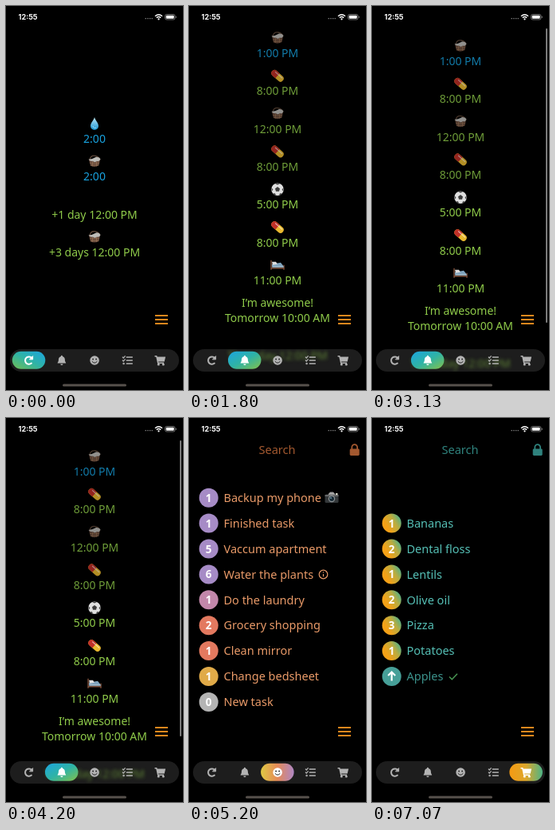
Animation of 222x480 px, one loop 7540 ms. Source, as an HTML page:

```html
<!DOCTYPE html>
<html lang="en">
<head>
<meta charset="utf-8">
<title>Reminders and lists</title>
<style>
  html, body { margin: 0; width: 100%; height: 100%; overflow: hidden; background: #000; }
  svg { display: block; width: 100%; height: 100%; }
  text { font-family: "Noto Sans", "Open Sans", sans-serif; }
  .time { font-size: 14px; text-anchor: middle; }
  .item { font-size: 14.5px; }
  .search { font-size: 14.6px; text-anchor: middle; }
  .count { font-size: 13.5px; font-weight: 700; fill: #fff; text-anchor: middle; }
  .clock { font: 700 9.1px Inter, sans-serif; fill: #fff; }
  .line { fill: none; stroke: currentColor; stroke-linecap: round; stroke-linejoin: round; }
</style>
</head>
<body>
<svg id="stage" viewBox="0 0 222 480">
  <defs>
    <linearGradient id="pill0" x1="0" y1="1" x2="1" y2="0"><stop stop-color="#72bf52"/><stop offset=".5" stop-color="#2fb3a5"/><stop offset="1" stop-color="#1ca5e0"/></linearGradient>
    <linearGradient id="pill1" x1="0" y1="0" x2="1" y2="1"><stop stop-color="#1ca5e0"/><stop offset=".5" stop-color="#2fb3a5"/><stop offset="1" stop-color="#84c24a"/></linearGradient>
    <linearGradient id="pill3"><stop stop-color="#dfc943"/><stop offset=".5" stop-color="#e58a58"/><stop offset="1" stop-color="#ae86c4"/></linearGradient>
    <linearGradient id="pill4"><stop stop-color="#f59a12"/><stop offset=".5" stop-color="#dda72c"/><stop offset="1" stop-color="#4db486"/></linearGradient>
    <linearGradient id="fruit" x1="0" y1=".8" x2="1" y2=".2"><stop offset=".25" stop-color="#f4a117"/><stop offset=".65" stop-color="#b9ac40"/><stop offset="1" stop-color="#45b08f"/></linearGradient>
    <linearGradient id="water" x1="0" y1="0" x2="0" y2="1"><stop stop-color="#bfe9fa"/><stop offset="1" stop-color="#1690d0"/></linearGradient>
    <clipPath id="navClip"><rect x="5" y="429" width="212" height="28" rx="14"/></clipPath>
    <filter id="blur" x="-10%" y="-60%" width="120%" height="220%"><feGaussianBlur stdDeviation="2"/></filter>

    <g id="drop">
      <path d="M0-8C1-4 5-1 5 3A5 5 0 0 1-5 3C-5-1-1-4 0-8Z" fill="url(#water)"/>
      <path d="M-2 3a2.5 2.5 0 0 0 4 2" fill="none" stroke="#9fe0f8"/>
    </g>
    <g id="basket">
      <path d="M-6-2Q-5-8 1-7Q6-6 7-2" fill="none" stroke="#5a4436" stroke-width="1.3"/>
      <path d="M-7-2H7L5.5 5Q0 8-5 5.5Z" fill="#65483a"/>
      <path d="M-6 2H6M-5 4.6H5M-2.5 0V6M2.5 0V6" stroke="#9a7557" stroke-width=".7"/>
      <path d="M-7.5-2.5Q-2-3 2-5.5Q6-6 7.5-3Q6 1 3-.5Q0 2-2-.5Q-5 .5-7.5-2.5Z" fill="#bdbcb8"/>
    </g>
    <g id="capsule" transform="rotate(42)">
      <rect x="-9" y="-4" width="18" height="8" rx="4" fill="#e9b92f"/>
      <path d="M0-4H-5A4 4 0 0 0-5 4H0Z" fill="#c03028"/>
      <path d="M-5-1.8H6" stroke="#fff" stroke-opacity=".6" stroke-width="1.2" stroke-linecap="round"/>
    </g>
    <g id="ball">
      <circle r="7.8" fill="#dedede"/>
      <path d="M0-3.2L3-1L2 2.6H-2L-3-1ZM-3-7.2H3L0-5.6ZM7.6-2L7.2 2.8L5.6 0ZM-7.6-2L-7.2 2.8L-5.6 0ZM3 5L6 5Q4 7.2 2 7.5ZM-3 5L-6 5Q-4 7.2-2 7.5Z" fill="#3c3c3c"/>
    </g>
    <g id="bed">
      <path d="M-8-6V6M8 0V6M-8 4H8" stroke="#80503a" stroke-width="1.4"/>
      <path d="M-7-1L4-3L8 2V3H-7Z" fill="#7fa3bd"/>
      <path d="M-7-4H-2L0-1L-6 0Z" fill="#dedede"/>
      <path d="M-6 2H7" stroke="#b9ccd8"/>
    </g>
    <g id="camera">
      <rect x="-8.5" y="-4.5" width="17" height="10.5" rx="1.5" fill="#34383a"/>
      <path d="M-8.5-3H8.5M-4-4.5L-2-7H2L4-4.5Z" fill="#aaa" stroke="#989898"/>
      <circle cy="1" r="4.2" fill="#8c9294"/><circle cy="1" r="3" fill="#182a34"/><circle cx="-1" r="1" fill="#6f94a6"/>
      <rect x="5" y="-6" width="2.5" height="2" fill="#d8d8c8"/>
    </g>

    <g id="reload" class="line" stroke-width="2">
      <path d="M3.2 3.6A4.7 4.7 0 1 1 3.6-3"/><path d="M4.9-5V-1.2H1.2Z" fill="currentColor" stroke-width="1"/>
    </g>
    <path id="bell" fill="currentColor" d="M0-6.2A1 1 0 0 1 1-5C3.4-4.4 4-2.6 4-.6C4 1.6 5.3 2.4 5.3 3.6H-5.3C-5.3 2.4-4 1.6-4-.6C-4-2.6-3.4-4.4-1-5A1 1 0 0 1 0-6.2ZM-1.6 4.5H1.6A1.6 1.6 0 0 1-1.6 4.5Z"/>
    <g id="smile">
      <circle r="5.8" fill="currentColor"/>
      <circle cx="-2" cy="-1.5" r=".9" fill="#222"/><circle cx="2" cy="-1.5" r=".9" fill="#222"/>
      <path d="M-3 1.5Q0 5 3 1.5" fill="none" stroke="#222" stroke-linecap="round"/>
    </g>
    <g id="tasks" class="line" stroke-width="1.5">
      <path d="M-1-4H6M-1 0H6M-1 4H6"/><path d="M-6-4L-5-3L-3-5.3M-6 0L-5 1L-3-1.3" stroke-width="1.2"/><circle cx="-4.7" cy="4" r=".5"/>
    </g>
    <g id="cart">
      <path fill="currentColor" d="M-7-6H-4.2L-3.8-4.4H6.6L5.2 1.4H-2.5L-2.2 2.6H4.6V4H-3.4L-5.3-4.6H-7Z"/>
      <circle cx="-2.2" cy="5.2" r="1.4" fill="currentColor"/><circle cx="3.8" cy="5.2" r="1.4" fill="currentColor"/>
    </g>
    <g id="lock">
      <rect x="-6" y="-1.5" width="12" height="8.5" rx="1.4" fill="currentColor"/>
      <path d="M-3.4-1V-3.4A3.4 3.4 0 0 1 3.4-3.4V-1" fill="none" stroke="currentColor" stroke-width="1.8"/>
    </g>
  </defs>
  <rect width="222" height="480"/>
  <g id="pages"></g>
  <rect id="thumb" x="218" y="28" width="2" rx="1" fill="#7c7c7c"/>
  <g id="status">
    <text class="clock" x="15.5" y="17">12:55</text>
    <path d="M174.5 15.6H184" stroke="#777" stroke-width="1.4" stroke-dasharray="1.5 1.2"/>
    <g fill="none" stroke="#fff" stroke-width="1.4"><path d="M187 12.8Q191.5 8.8 196 12.8"/><path d="M188.8 14.8Q191.5 12.4 194.2 14.8"/></g>
    <circle cx="191.5" cy="16.4" r="1.1" fill="#fff"/>
    <rect x="199.5" y="10.5" width="12.5" height="6.5" rx="2" fill="none" stroke="#888" stroke-width=".8"/>
    <rect x="200.7" y="11.7" width="10" height="4.1" rx="1" fill="#fff"/>
    <path d="M213.2 12.8v2" stroke="#888"/>
  </g>
  <path d="M187 387H203M187 392H203M187 397H203" stroke="#df871d" stroke-width="2"/>
  <rect x="5" y="429" width="212" height="28" rx="14" fill="#1d1d1d"/>
  <g clip-path="url(#navClip)"><g id="haze" filter="url(#blur)" opacity=".6"></g></g>
  <rect id="pill" y="431.8" width="41.5" height="22" rx="11"/>
  <g id="tabs"></g>
  <rect x="71" y="472.5" width="80" height="3" rx="1.5" fill="#57514c"/>
</svg>
<script>
const LOOP = 7540, FPS = 15;
const BLUE = '#18a0dc', GREEN = '#8fcb4a';
const $ = id => document.getElementById(id);
const icon = (id, x, y, color = '#fff') => `<g transform="translate(${x} ${y})" color="${color}"><use href="#${id}"/></g>`;
const time = (label, y, color) => `<text class="time" x="111" y="${y}" fill="${color}">${label}</text>`;

function timers() {
  return [['drop', '2:00', BLUE], ['basket', '2:00', BLUE], ['', '+1 day 12:00 PM', GREEN], ['basket', '+3 days 12:00 PM', GREEN]]
    .map(([id, label, color], i) => {
      const y = 171 + 47.3 * i;
      return (id && icon(id, 111, y - 24)) + time(label, y, color);
    }).join('');
}

const thursday = time('Thursday 12:00 PM', 442, GREEN);

function reminders() {
  const rows = [
    ['basket', '1:00 PM', BLUE], ['capsule', '8:00 PM', GREEN], ['basket', '12:00 PM', GREEN],
    ['capsule', '8:00 PM', GREEN], ['ball', '5:00 PM', GREEN], ['capsule', '8:00 PM', GREEN], ['bed', '11:00 PM', GREEN]
  ];
  return rows.map(([id, label, color], i) => {
    const y = 64 + 47.3 * i;
    return `<g opacity="${i < 4 ? .77 : 1}">${icon(id, 111, y - 24)}${time(label, y, color)}</g>`;
  }).join('') + time('I’m awesome!', 376, GREEN) + time('Tomorrow 10:00 AM', 395, GREEN) + thursday;
}

const header = color => `<text class="search" x="110.5" y="45" fill="${color}">Search</text>` + icon('lock', 207.7, 40, color);

function row(label, count, y, fill, color) {
  return `<circle cx="24.7" cy="${y}" r="12" fill="${fill}"/><text class="count" x="24.7" y="${y + 5}">${count}</text>`
    + `<text class="item" x="43.5" y="${y + 5.2}" fill="${color}">${label}</text>`;
}

function tasks() {
  const purple = '#a68bc6', red = '#e3795f', ink = '#e99a68';
  const rows = [
    ['Backup my phone', 1, purple], ['Finished task', 1, purple], ['Vaccum apartment', 5, purple],
    ['Water the plants', 6, purple], ['Do the laundry', 1, '#c287aa'], ['Grocery shopping', 2, red],
    ['Clean mirror', 1, red], ['Change bedsheet', 1, '#e0aa48'], ['New task', 0, '#b4b4b4']
  ];
  return header('#a2582f') + rows.map(([label, n, fill], i) => row(label, n, 99.7 + 31.9 * i, fill, ink)).join('')
    + icon('camera', 179, 100)
    + `<g fill="none" stroke="${ink}" stroke-width="1.2"><circle cx="168.5" cy="195.5" r="5.3"/><path d="M168.5 195v3.2M168.5 192.3v1.3"/></g>`;
}

function groceries() {
  const rows = [['Bananas', 1], ['Dental floss', 2], ['Lentils', 1], ['Olive oil', 2], ['Pizza', 3], ['Potatoes', 1]];
  return header('#2f827d') + rows.map(([label, n], i) => row(label, n, 131.6 + 31.9 * i, 'url(#fruit)', '#55bfb5')).join('')
    + row('Apples', '', 323, '#469f98', '#3b918a')
    + '<path d="M24.7 328.5V318M20.2 322L24.7 317.5L29.2 322" fill="none" stroke="#fff" stroke-width="2.2"/>'
    + '<path d="M97 323.5L100.3 326.7L107 319.8" fill="none" stroke="#4a9a55" stroke-width="1.4"/>';
}

$('pages').innerHTML = [timers, reminders, tasks, groceries].map(page => `<g>${page()}</g>`).join('');
$('haze').innerHTML = thursday;
$('tabs').innerHTML = ['reload', 'bell', 'smile', 'tasks', 'cart'].map((id, i) => icon(id, 28.7 + 41.2 * i, 443)).join('');
const pages = [...$('pages').children], tabs = [...$('tabs').children];

// Tab starts: time, tab, page, pill gradient
const visits = [[0, 0, 0, 0], [1800, 1, 1, 1], [5200, 2, 2, 3], [6070, 3, 2, 3], [7000, 4, 3, 4]];

// Overscroll: slow pull, longer pull, spring back
function pull(t) {
  if (t < 1860) return 0;
  if (t < 2720) return 1;
  if (t < 3390) {
    const p = Math.min(1, (t - 2660) / 470);
    return 1 + 9 * (1 - (1 - p) ** 2);
  }
  if (t < 4190) return 17;
  return 1 + 7 * Math.max(0, 1 - (t - 4200) / 267) ** 2;
}

function draw(ms) {
  const t = Math.floor(ms * FPS / 1000 + .1) * 1000 / FPS;
  const [, tab, page, paint] = visits.filter(v => v[0] <= t + 6).pop();
  pages.forEach((p, i) => p.style.display = i === page ? '' : 'none');
  tabs.forEach((g, i) => g.setAttribute('color', i === tab ? '#fff' : '#b3b3b3'));
  $('pill').setAttribute('x', 7.8 + 41.15 * tab);
  $('pill').setAttribute('fill', `url(#pill${paint})`);

  const y = pull(t), listing = page === 1;
  pages[1].setAttribute('transform', `translate(0 ${y})`);
  $('haze').firstChild.setAttribute('transform', `translate(0 ${y})`);
  $('haze').style.display = listing ? '' : 'none';
  $('thumb').style.display = listing && t > 2720 ? '' : 'none';
  $('thumb').setAttribute('height', 378 - y);
}

const start = performance.now();
function tick() {
  draw((performance.now() - start) % LOOP);
  requestAnimationFrame(tick);
}
tick();
</script>
</body>
</html>
```
